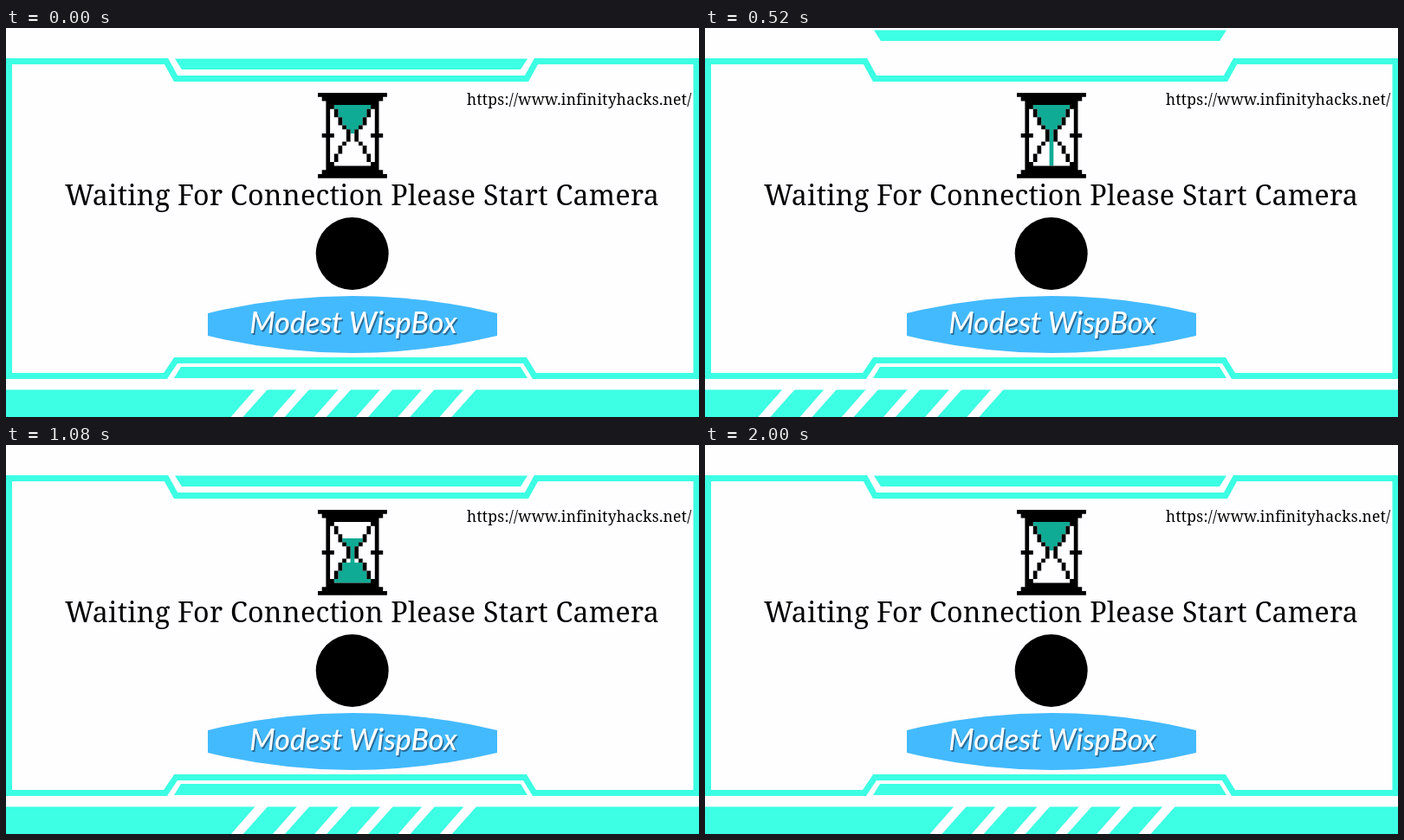
These frames come from a looping animation (800 px wide and 450 px high, 2.04 s). An HTML page:

```html
<!DOCTYPE html>
<html lang="en">
<head>
<meta charset="utf-8">
<title>Waiting for connection</title>
<style>
html, body { margin: 0; width: 100%; height: 100%; overflow: hidden; background: #fefdff; }
svg { display: block; width: 800px; height: 450px; }
.serif { font-family: "Noto Serif", serif; letter-spacing: .27px; }
.label { font: italic 500 34px Lato, sans-serif; text-anchor: middle; }
</style>
</head>
<body>
<svg viewBox="0 0 800 450">
  <rect width="800" height="450" fill="#fefdff"/>
  <g fill="#3cffe3">
    <path d="M3.5 38.5H185L196 58.5H601L612 38.5H797V402.5H610L599 384.5H196L184 402.5H3.5Z"
      fill="none" stroke="#3cffe3" stroke-width="7"/>
    <path d="M202 392H594L602 405H194Z"/>
    <path id="bar" d="M195 35.5H602L594 48H203Z"/>
    <rect y="418.5" width="800" height="32"/>
  </g>
  <path id="stripes" fill="#fefdff"/>

  <g id="glass">
    <path id="sand" fill="#10ab95"/>
    <path id="outline"/>
  </g>

  <text class="serif" x="68" y="205" font-size="32.2">Waiting For Connection Please Start Camera</text>
  <text class="serif" x="532" y="89" font-size="17.5">https://www.infinityhacks.net/</text>
  <circle cx="399.7" cy="261" r="42"/>
  <path d="M233 330Q400 290 567 330V356Q400 396 233 356Z" fill="#43bafe"/>
  <text class="label" x="402.5" y="355" fill="#2a6c98">Modest WispBox</text>
  <text class="label" x="401" y="353" fill="#fff">Modest WispBox</text>
</svg>
<script>
const LOOP = 2040, STEP = 40;
// The hourglass sits on a grid of 17 by 21 square cells
const CELL = 4.7, COLS = 17, ROWS = 21, MID = 10, LEFT = 360, TOP = 75;
const $ = id => document.getElementById(id);
const clamp = (v, lo, hi) => Math.min(hi, Math.max(lo, v));
const cells = (col, row, w, h = 1) =>
  `M${LEFT + col * CELL} ${TOP + row * CELL}h${w * CELL}v${h * CELL}h${-w * CELL}z`;
// Eased 0..1 between two times
const ease = (t, from, to) => (1 - Math.cos(Math.PI * clamp((t - from) / (to - from), 0, 1))) / 2;

// Column of the left glass wall by distance from the neck
const WALL = [7, 7, 6, 5, 5, 4, 4, 3];

function outline() {
  let d = '';
  for (let i = 0; i < 3; i++)
    for (const row of [i, ROWS - 1 - i]) d += cells(i, row, COLS - 2 * i);
  for (const col of [2, 14]) d += cells(col, 2, 1, ROWS - 4);
  for (const col of [1, 13]) d += cells(col, MID, 3);
  WALL.forEach((col, k) => {
    for (const row of [MID - k, MID + k])
      d += cells(col, row, 1) + cells(COLS - 1 - col, row, 1);
  });
  return d;
}

function sand(t) {
  const gone = clamp(Math.floor((t - 860) / 55), 0, 7);
  const piled = clamp(Math.floor((t - 640) / 75), 0, 7);
  const layer = (k, row) => cells(WALL[k] + 1, row, COLS - 2 - 2 * WALL[k]);
  let d = '';
  for (let k = 1; k <= 7 - gone; k++) d += layer(k, MID - k);
  for (let k = 7; k > 7 - piled; k--) d += layer(k, MID + k);
  if (t > 0 && t < 1240) d += cells(8, MID, 1, 8 * clamp(t / 200, 0, 1));
  return d;
}

function stripeShift(t) {
  const fall = ms => 2.674e-6 * Math.max(0, ms) ** 3;
  return t < 615 ? -fall(t - 100) : fall(1130 - t);
}

function draw(t) {
  const lift = 35 * (ease(t, 190, 580) - ease(t, 670, 1060));
  $('bar').setAttribute('transform', `translate(0 ${-lift})`);
  $('stripes').setAttribute('transform', `translate(${stripeShift(t)} 0)`);
  $('sand').setAttribute('d', sand(t));
  $('glass').setAttribute('transform',
    `rotate(${180 * ease(t, 1464, 2000)} ${LEFT + COLS * CELL / 2} ${TOP + ROWS * CELL / 2})`);
}

let slats = '';
for (let i = 0; i < 6; i++) slats += `M${287.5 + i * 48.2} 418h14.5l-28.5 32h-14z`;
$('stripes').setAttribute('d', slats);
$('outline').setAttribute('d', outline());

const start = performance.now();
function tick() {
  const t = (performance.now() - start) % LOOP;
  draw(Math.floor(t / STEP) * STEP);
  requestAnimationFrame(tick);
}
tick();
</script>
</body>
</html>
```
